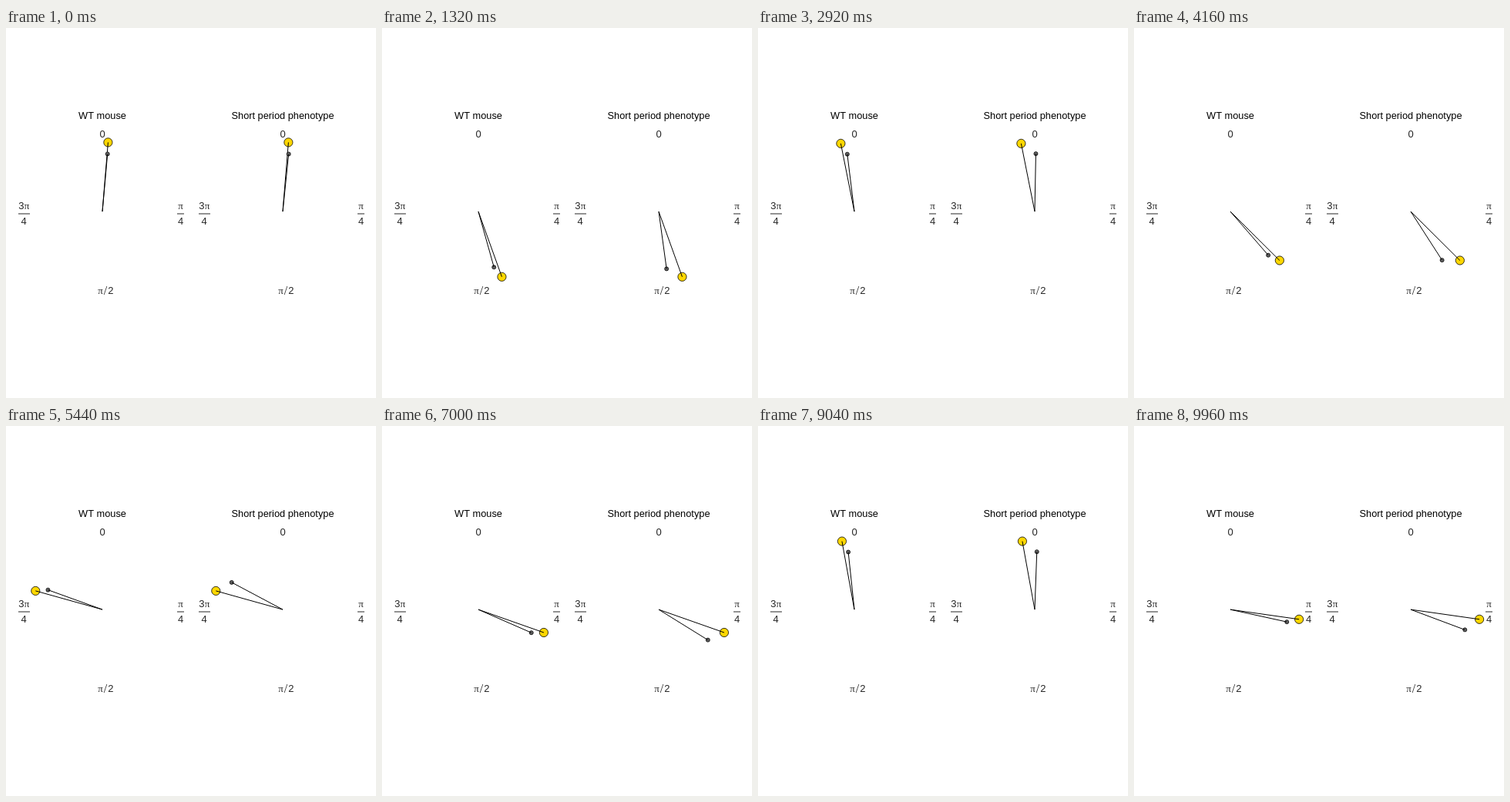
These frames come from a looping animation (480x480 px, 10 s). An HTML page with a canvas:

```html
<!DOCTYPE html>
<html lang="en">
<head>
<meta charset="utf-8">
<title>Phase clocks</title>
<style>
  html, body { margin: 0; width: 100%; height: 100%; overflow: hidden; background: #fff; }
  canvas { display: block; width: 480px; height: 480px; }
</style>
</head>
<body>
<canvas id="stage" width="480" height="480"></canvas>
<script>
const ctx = document.getElementById('stage').getContext('2d');
const LOOP = 10000, FRAME = 40;
const SANS = '"Liberation Sans", Arial, sans-serif';
const SERIF = '"Liberation Serif", Times, serif';
const INK = '#262626';
const DEG = Math.PI / 180;
const STEP = 1.5 * Math.PI;   // degrees the light turns per frame
const SETTLE = 10;            // frames for the clock to lock on
const CY = 238.1, LIGHT_R = 90, CLOCK_R = 75;

const panels = [
  { x: 125, title: 'WT mouse', lead: 4.25 },
  { x: 359, title: 'Short period phenotype', lead: 12.4 }
];

function text(str, x, y, size = 13, family = SANS, color = INK) {
  ctx.font = `${size}px ${family}`;
  ctx.fillStyle = color;
  ctx.fillText(str, x, y);
}

function line(x1, y1, x2, y2, color) {
  ctx.strokeStyle = color;
  ctx.lineWidth = 1;
  ctx.beginPath();
  ctx.moveTo(x1, y1);
  ctx.lineTo(x2, y2);
  ctx.stroke();
}

const pi = (x, y) => text('π', x, y, 13, SERIF);

function labels({ x, title }) {
  text(title, x, 118, 12.8, SANS, '#000');
  text('0', x, 142);

  pi(x + 101.5, 235);
  line(x + 97, 241, x + 106, 241, INK);
  text('4', x + 101.5, 255);

  text('3', x - 105.2, 235);
  pi(x - 98, 235);
  line(x - 109, 241, x - 94, 241, INK);
  text('4', x - 102, 255);

  pi(x - 2.5, 345);
  text('/', x + 4, 346, 16, SERIF);
  text('2', x + 10.8, 345);
}

function hand(cx, degrees, length, radius, fill) {
  const x = cx + length * Math.sin(degrees * DEG);
  const y = CY - length * Math.cos(degrees * DEG);
  ctx.beginPath();
  ctx.arc(x, y, radius, 0, 2 * Math.PI);
  ctx.fillStyle = fill;
  ctx.fill();
  ctx.strokeStyle = '#000';
  ctx.lineWidth = 0.8;
  ctx.stroke();
  line(cx, CY, x, y, '#000');
}

function draw(time) {
  const n = Math.floor((time % LOOP) / FRAME) + 1;
  const light = STEP * n;
  const locked = 1 - Math.exp(-n / SETTLE);
  ctx.fillStyle = '#fff';
  ctx.fillRect(0, 0, 480, 480);
  ctx.textAlign = 'center';
  for (const panel of panels) {
    labels(panel);
    hand(panel.x, light, LIGHT_R, 5.6, '#ffd700');
    hand(panel.x, light + panel.lead * locked, CLOCK_R, 2.5, '#666');
  }
}

let start;
function tick(now) {
  start ??= now;
  draw(Math.max(0, now - start));
  requestAnimationFrame(tick);
}
draw(0);
requestAnimationFrame(tick);
</script>
</body>
</html>
```
